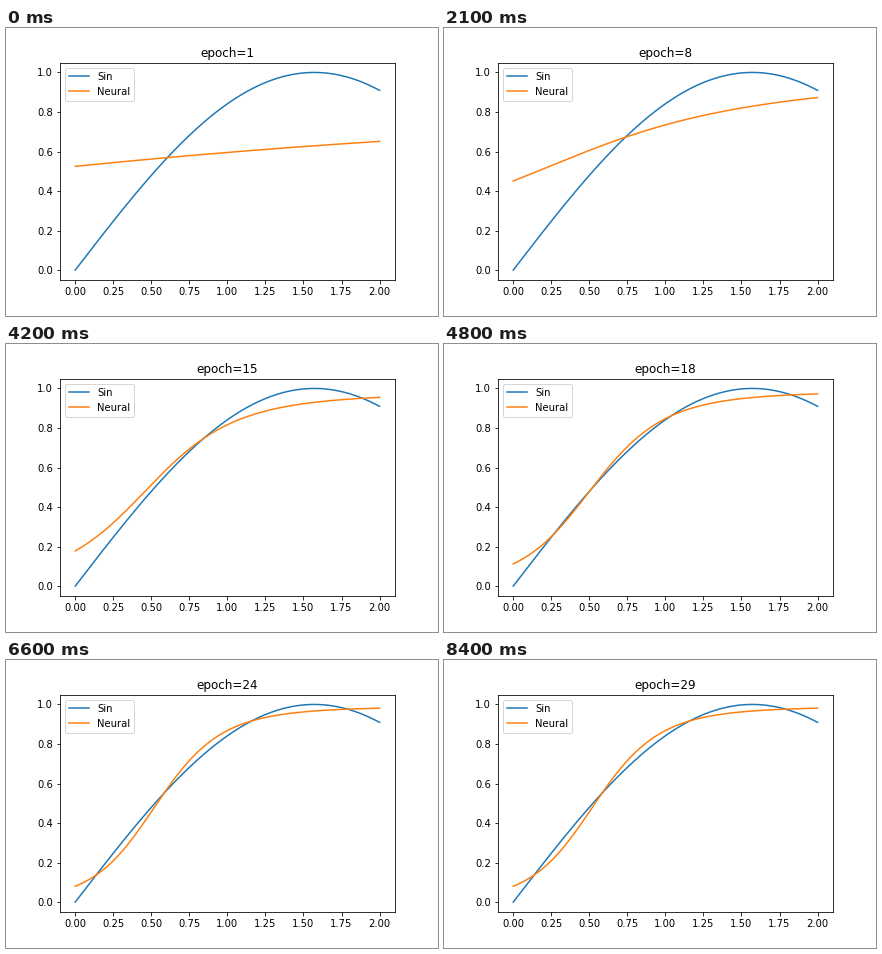
A matplotlib script that plays this animation: 432 px wide and 288 px high, repeating every 8.7 s.

```python
import numpy as np
import matplotlib.pyplot as plt
from matplotlib.animation import FuncAnimation

EPOCHS = 29
STEP_MS = 300
SKIP_AFTER = 16  # the count jumps over one epoch here, then holds at the end


def epoch_at(i):
    epoch = i + 1
    return min(epoch + (epoch > SKIP_AFTER), EPOCHS)


def smoothstep(v, start, end):
    u = np.clip((v - start) / (end - start), 0, 1)
    return u * u * (3 - 2 * u)


def network(x, epoch):
    """Output blends from a nearly straight line to the trained S-curve."""
    trained = smoothstep(epoch, 4.1, 22.4)
    age = (epoch - 1) / 7.5
    tilt = 0.31 + 0.52 * age * np.exp(1 - age)
    early = 0.1 + tilt * x - 0.024 * x**2
    late = 5.37 * np.tanh(0.865 * (x - 0.36)) - 0.82
    z = (1 - trained) * early + trained * late
    return 1 / (1 + np.exp(-z))


x = np.linspace(0, 2, 200)
fig, ax = plt.subplots(figsize=(6, 4), dpi=72)
fig.subplots_adjust(left=0.125, right=0.9, bottom=0.125, top=0.88)
ax.plot(x, np.sin(x), label="Sin")
neural, = ax.plot(x, network(x, 1), label="Neural")
ax.set_xlim(-0.1, 2.1)
ax.set_ylim(-0.05, 1.05)
ax.set_xticks(np.linspace(0, 2, 9))
ax.set_yticks(np.linspace(0, 1, 6))
ax.legend(loc="upper left")
title = ax.set_title("epoch=1")


def update(i):
    epoch = epoch_at(i)
    neural.set_ydata(network(x, epoch))
    title.set_text(f"epoch={epoch}")
    return neural, title


anim = FuncAnimation(fig, update, frames=EPOCHS, interval=STEP_MS,
                     repeat=True, repeat_delay=0)
plt.show()
```
